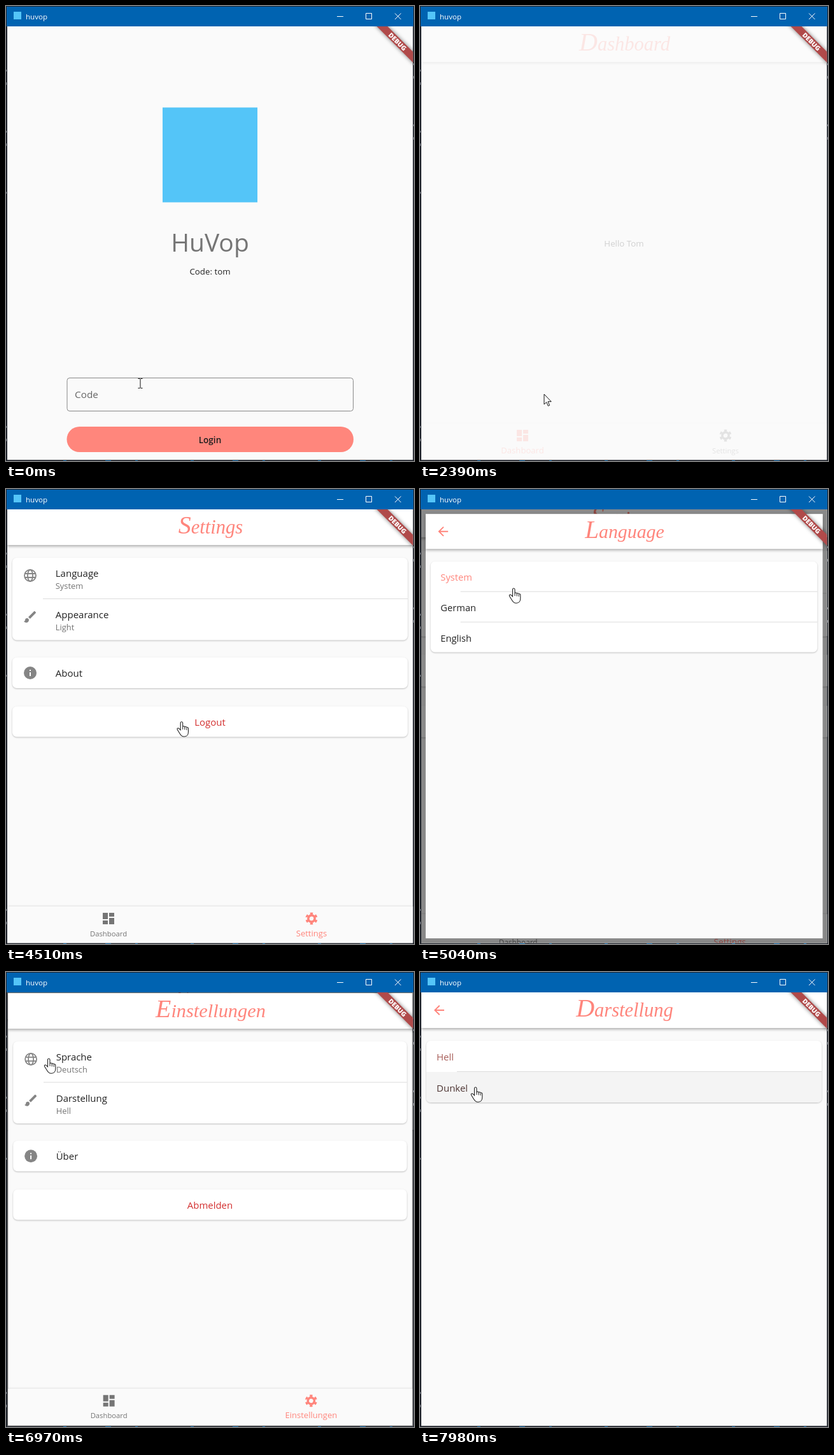
An HTML page that plays this animation: 641 px wide and 715 px high, repeating every 8000 ms.

```html
<!DOCTYPE html>
<html lang="en">
<head>
<meta charset="utf-8">
<title>Login and settings demo</title>
<style>
html, body { margin: 0; width: 100%; height: 100%; overflow: hidden; background: #20242c; }
svg { display: block; width: 100vw; height: 100vh; }
text { font-family: "Open Sans", "Noto Sans", sans-serif; white-space: pre; }
.script { font-family: "Liberation Serif", serif; font-style: italic; }
.bar { filter: drop-shadow(0 2px 2px rgba(0,0,0,.32)); }
.card { filter: drop-shadow(0 1px 1px rgba(0,0,0,.24)); }
.nav { filter: drop-shadow(0 -1px 1px rgba(0,0,0,.1)); }
.ribbon { filter: drop-shadow(0 0 3px rgba(0,0,0,.5)); }
</style>
</head>
<body>
<svg viewBox="0 0 641 715">
  <defs>
    <clipPath id="client"><rect x="2" y="32" width="637.5" height="681.5"/></clipPath>
    <clipPath id="navClip"><rect x="2" y="656" width="637" height="58"/></clipPath>
  </defs>
  <rect width="641" height="715" fill="#20242c"/>
  <path d="M90 714.5H641" stroke="#176aa8" stroke-dasharray="5 61 9 38 4 83"/>
  <path d="M.5 100V300M.5 660V690M640.5 90V260" stroke="#8a8f98" stroke-dasharray="3 17 4 72"/>
  <rect x="1" y="1" width="639" height="31" fill="#0063b1"/>
  <rect x="12" y="9" width="12" height="12" fill="#54c5f8"/>
  <text x="31" y="21" font-size="11.6" fill="#fff">huvop</text>
  <path d="M520 16.5h10M565.5 11.5h9v9h-9zM611 11.5l9.5 9.5M620.5 11.5l-9.5 9.5" fill="none" stroke="#fff"/>
  <g id="view" clip-path="url(#client)"></g>
  <g clip-path="url(#client)">
    <g transform="translate(615 56) rotate(45)">
      <rect class="ribbon" x="-60" y="-6" width="120" height="12" fill="#b04a4a"/>
      <text y="3.7" font-size="10.2" font-weight="800" fill="#fff" text-anchor="middle">DEBUG</text>
    </g>
  </g>
  <g id="pointer"></g>
</svg>
<script>
const LOOP = 8000, STEP = 200 / 3, PHASE = 36;
const PINK = [255, 133, 124], GREY = [117, 117, 117], DARK = [34, 34, 34];
const CX = 320.5, CY = 372.5;
const view = document.getElementById('view');
const pointer = document.getElementById('pointer');
const pen = document.createElement('canvas').getContext('2d');

const clamp = u => u < 0 ? 0 : u > 1 ? 1 : u;
const ramp = (t, from, dur) => clamp((t - from) / dur);
const lerp = (a, b, u) => a + (b - a) * u;
const mix = (a, b, u) => `rgb(${a.map((v, i) => Math.round(lerp(v, b[i], u)))})`;
const rgb = c => `rgb(${c})`;

const text = (s, x, y, size, fill, more = '') =>
  `<text x="${x}" y="${y}" font-size="${size}" fill="${fill}" ${more}>${s}</text>`;
const mid = (s, x, y, size, fill, more = '') => text(s, x, y, size, fill, 'text-anchor="middle" ' + more);
const rect = (x, y, w, h, fill, more = '') =>
  `<rect x="${x}" y="${y}" width="${w}" height="${h}" fill="${fill}" ${more}/>`;
const fade = (s, o) => `<g opacity="${o}">${s}</g>`;
const scaled = (s, k, o = 1) =>
  `<g opacity="${o}" transform="translate(${CX} ${CY}) scale(${k}) translate(${-CX} ${-CY})">${s}</g>`;

const backdrop = rect(2, 32, 637.5, 681.5, '#fafafa');
const card = (y, h) => rect(10, y, 621, h, '#fff', 'rx="7" class="card"');
const rule = y => `<path d="M58 ${y}H631" stroke="#dcdcdc"/>`;
const appBar = title => rect(2, 32, 637.5, 56, '#fff', 'class="bar"') +
  `<text class="script" x="321.5" y="70" text-anchor="middle" font-size="30.5" fill="${rgb(PINK)}">` +
  `<tspan font-size="40">${title[0]}</tspan>${title.slice(1)}</text>`;

const icons = {
  tiles: c => `<path fill="${c}" d="M-9 1h8V-9h-8zM-9 9h8V3h-8zM1 9h8V-1H1zM1-9v6h8v-6z"/>`,
  gear: c => `<g fill="none" stroke="${c}" transform="rotate(15)"><circle r="5.1" stroke-width="3.6"/>
    <circle r="8" stroke-width="3.2" pathLength="12" stroke-dasharray="1 1"/></g>`,
  globe: c => `<g fill="none" stroke="${c}" stroke-width="1.8"><circle r="9"/><ellipse rx="4" ry="9"/>
    <path d="M-8-3H8M-8 3H8"/></g>`,
  brush: c => `<path fill="${c}" d="M-5 2c-1.7 0-3 1.3-3 3 0 1.3-1.2 2-2 2 .9 1.2 2.5 2 4 2 2.2 0 4-1.8 4-4
    0-1.7-1.3-3-3-3zM8.7-7.4L7.4-8.7c-.4-.4-1-.4-1.4 0L-3 .3-.2 3l8.9-9c.4-.4.4-1 0-1.4z"/>`,
  info: c => `<circle r="10" fill="${c}"/><path fill="#fff" d="M-1-1h2v6h-2zM-1-5h2v2h-2z"/>`,
  back: c => `<path fill="${c}" d="M8-1H-4.2l5.6-5.6L0-8l-8 8 8 8 1.4-1.4L-4.2 1H8z"/>`
};
const icon = (name, x, y, c) => `<g transform="translate(${x} ${y})">${icons[name](c)}</g>`;

const words = {
  en: { settings: 'Settings', lang: 'Language', now: 'System', look: 'Appearance', light: 'Light',
        about: 'About', out: 'Logout', list: ['System', 'German', 'English'], pick: 0 },
  de: { settings: 'Einstellungen', lang: 'Sprache', now: 'Deutsch', look: 'Darstellung', light: 'Hell',
        about: 'Über', out: 'Abmelden', list: ['Systemsprache', 'Deutsch', 'Englisch'], pick: 1 }
};

function login(t) {
  const f = ramp(t, 490, 260), size = lerp(15.3, 11.5, f);
  const typed = 'tom'.slice(0, [1380, 1480, 1570].filter(k => t >= k).length);
  const caretOn = t > 520 && (t < 1050 || t > 1380);
  pen.font = '15.3px "Open Sans", "Noto Sans", sans-serif';
  const caretX = 108.5 + pen.measureText(typed).width;
  return rect(246, 159.5, 149, 149, '#54c5f8') +
    mid('HuVop', CX, 386, 39, '#757575') +
    mid('Code: tom', CX, 422, 13.3, '#222') +
    rect(96, 584.5, 449.5, 52, 'none',
      `rx="4" stroke="${mix([136, 136, 136], PINK, f)}" stroke-width="${1 + f}"`) +
    (f ? rect(104, 582, 37 * f, 5, '#fafafa') : '') +
    text('Code', 108, lerp(616, 589, f), size, mix([102, 102, 102], PINK, f)) +
    text(typed, 108, 616, 15.3, '#222') +
    (caretOn ? rect(caretX, 599, 2, 21, rgb(PINK)) : '') +
    rect(95.5, 661, 450.5, 40, '#ff867c', 'rx="20"') +
    mid('Login', CX, 687, 13.5, '#1d1d1d', 'font-weight="600"');
}

// n runs from 0 (left tab) to 1 (right tab)
function nav(t, n, label) {
  const item = (name, s, x, u) => icon(name, x, 675, mix(GREY, PINK, u)) +
    mid(s, x, 702.5, lerp(11.3, 13.1, u), mix(GREY, PINK, u));
  const r = ramp(t, 3400, 150), gone = ramp(t, 3650, 350);
  return rect(2, 656, 637.5, 58, '#fafafa', 'class="nav"') +
    (r > 0 && gone < 1 ? `<circle clip-path="url(#navClip)" cx="480" cy="685" r="${35 * r}" fill="#eee" opacity="${1 - gone}"/>` : '') +
    item('tiles', 'Dashboard', 161, 1 - n) + item('gear', label, 480, n);
}

function settings(w) {
  const row = (name, y, a, b) => icon(name, 38, y, '#858585') +
    text(a, 77.8, y + (b ? 2 : 6), 15, '#222') + (b ? text(b, 77.8, y + 21, 12.9, '#757575') : '');
  return appBar(w.settings) + card(108, 129.5) + rule(172.5) + card(264.5, 48.5) + card(341.5, 48) +
    row('globe', 136, w.lang, w.now) + row('brush', 201, w.look, w.light) + row('info', 289, w.about) +
    mid(w.out, CX, 372, 15, '#d32f2f');
}

function choices(title, list, colours, hover) {
  const h = 49 * list.length - 1;
  return backdrop + appBar(title) + icon('back', 30, 60, rgb(PINK)) + card(108, h) +
    list.map((s, i) => {
      const y = 108 + 49 * i, last = i === list.length - 1;
      const glow = hover !== i ? '' : last
        ? `<path fill="#f4f4f4" d="M10 ${y}H631v41q0 7-7 7H17q-7 0-7-7z"/>` : rect(10, y, 621, 49, '#f4f4f4');
      return glow + text(s, 26, y + 31, 15, colours[i]) + (last ? '' : rule(y + 48.5));
    }).join('');
}

function home(t) {
  const n = ramp(t, 3640, 300), w = t < 5770 ? words.en : words.de;
  const dash = appBar('Dashboard') + mid('Hello Tom', CX, 378, 13.3, '#111');
  const body = n < 1 ? fade(dash, 1 - n) + (n ? fade(settings(w), n) : '') : settings(w);
  return backdrop + body + nav(t, n, w.settings);
}

function languages(t, hover) {
  const w = t < 5770 ? words.en : words.de;
  return choices(w.lang, w.list, w.list.map((s, i) => rgb(i === w.pick ? PINK : DARK)), hover);
}

function themes(t, hover) {
  const u = .4 * ramp(t, 7900, 60);
  return choices('Darstellung', ['Hell', 'Dunkel'], [mix(PINK, DARK, u), mix(DARK, PINK, u * .5)], hover);
}

function zoom(u, from, to) {
  if (u <= 0) return from;
  if (u >= 1) return to;
  const e = 1 - (1 - u) ** 4;
  return scaled(from, 1 + .05 * e) + rect(2, 32, 638, 682, '#000', `opacity="${.6 * clamp(2 * u)}"`) +
    scaled(to, .85 + .15 * e, clamp(4 * u));
}

// start, end, x, y of the pointer tip, shape after the move
const moves = [
  [0, 1, 211, 593, 'beam'], [230, 330, 195, 610, 'beam'], [2330, 2331, 195, 610, 'arrow'],
  [3130, 3450, 461, 668, 'hand'], [4200, 4740, 147, 156, 'hand'], [5530, 5700, 143, 196, 'hand'],
  [6200, 6620, 30, 58, 'hand'], [6790, 6960, 67, 136, 'hand'], [7060, 7320, 75, 196, 'hand'],
  [7560, 7800, 87, 181, 'hand']
];
const shapes = {
  beam: '<path d="M-3.5-7.5h3M.5-7.5h3M-3.5 7.5h3M.5 7.5h3M0-7V7" stroke="#111" fill="none"/>',
  arrow: '<path d="M0 0v16l3.7-3.5 2.6 6 2.3-1-2.6-5.8h5.2z" fill="#fff" stroke="#111"/>',
  hand: `<path fill="#fff" stroke="#222" stroke-width="1.1" d="M-1.5 2c0-2.6 3.5-2.6 3.5 0v6c.5-1.5 3-1.2 3.2.3
    .8-1 2.9-.6 3 .8 1-.7 2.6-.2 2.6 1.6v5c0 4-2 7.5-5.8 7.5h-1.5c-3 0-4.5-2-6-4.5l-4-6.5
    c-.8-1.8 1.3-3 2.7-1.5l2.3 2.3z"/><path stroke="#222" d="M2 8v4M5.2 9v3.5M8.2 10v3"/>`
};

function tip(t) {
  let [, , x, y, shape] = moves[0];
  for (const [a, b, px, py, kind] of moves) {
    if (t < a) break;
    const u = ramp(t, a, b - a), e = u * u * (3 - 2 * u);
    x = lerp(x, px, e);
    y = lerp(y, py, e);
    if (u > .8) shape = kind;
  }
  return { x, y, shape };
}

function scene(t, p) {
  if (t < 2330) return backdrop + fade(login(t), 1 - ramp(t, 1860, 340));
  if (t < 2600) return backdrop + fade(home(t), ramp(t, 2330, 230));
  const row = p.y < 108 ? -1 : Math.floor((p.y - 108) / 49);
  const hover = on => on ? row : -1;
  if (t < 6790) return zoom(ramp(t, 4921, 300), home(t), languages(t, hover(t > 5221)));
  if (t < 7400) return zoom(ramp(t, 6790, 300), languages(t, -1), home(t));
  return zoom(ramp(t, 7450, 300), home(t), themes(t, hover(t > 7750)));
}

let shown = null;
function draw(now) {
  const tick = Math.floor(((now % LOOP) - PHASE) / STEP);
  if (tick !== shown) {
    shown = tick;
    const t = tick < 0 ? 0 : PHASE + tick * STEP, p = tip(t);
    view.innerHTML = scene(t, p);
    pointer.setAttribute('transform', `translate(${p.x} ${p.y})`);
    pointer.innerHTML = shapes[p.shape];
  }
  requestAnimationFrame(() => draw(performance.now() - start));
}
const start = performance.now();
draw(0);
</script>
</body>
</html>
```
